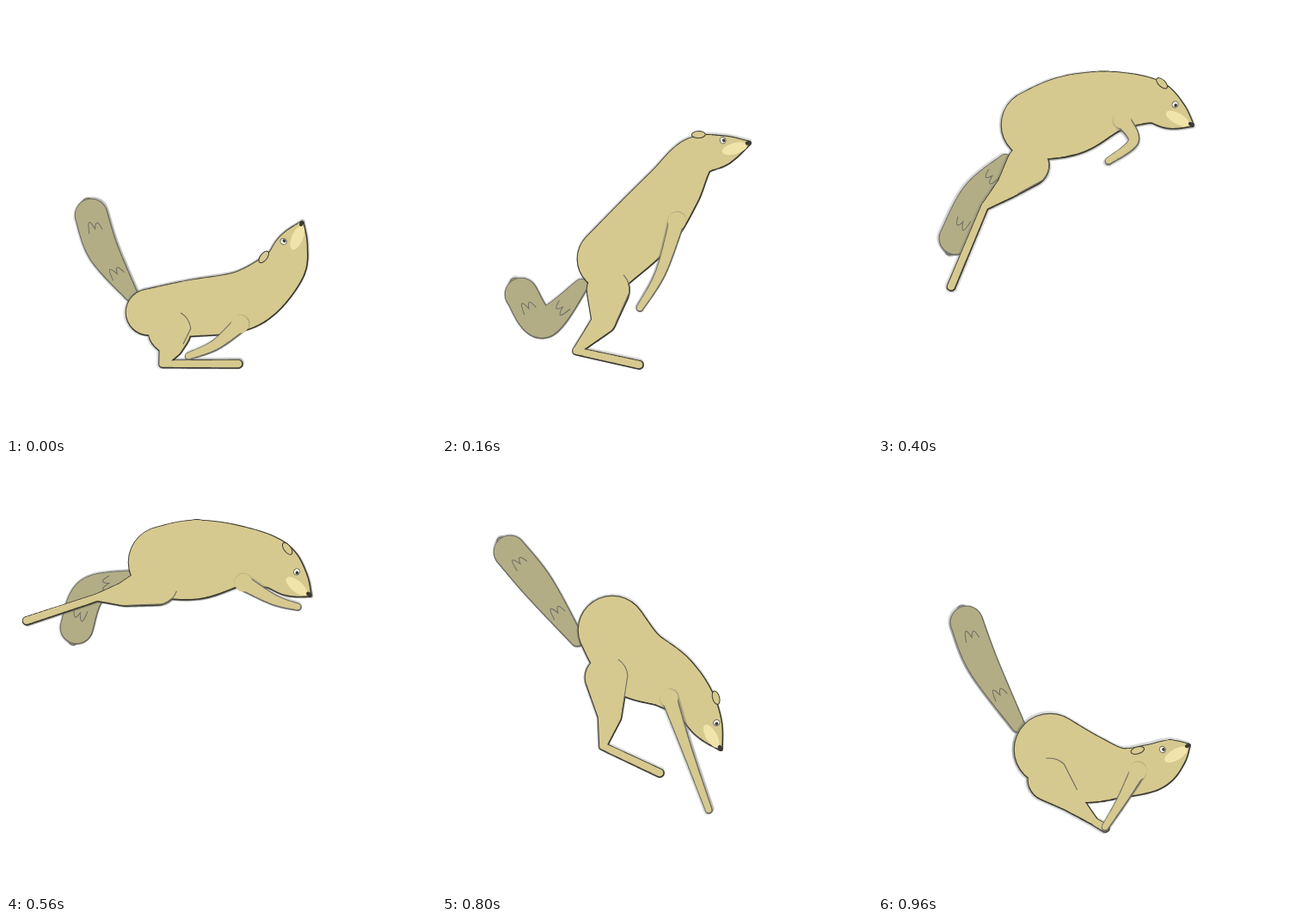
Animation, 500 px wide and 500 px high, one loop 1.04 s. Source, as an HTML page with a canvas:

```html
<!DOCTYPE html>
<html>
<head>
<meta charset="utf-8">
<style>
html, body { margin: 0; width: 100%; height: 100%; overflow: hidden; background: #fff; }
canvas { display: block; width: 500px; height: 500px; }
</style>
</head>
<body>
<canvas id="stage" width="500" height="500"></canvas>
<script>
const ctx = document.getElementById('stage').getContext('2d');
const STEP = 80, STEPS = 13;
const FUR = '#d6c98f', TAIL = '#b3ad86', CREAM = '#f1e4aa', INK = '#3b3a33', PENCIL = '#6d6c64';

// Joint radii, root to tip. Spine joints carry their own radius.
const RADII = { tail: [8, 18, 19], leg: [25, 14, 4.5, 5], arm: [9, 6, 4] };

// Joints at key steps. Spine: rump, loin, chest, nape. Leg: hip, knee, heel, toe.
const poses = [
  { at: 0, nose: [[344, 252]],
    spine: [[166, 356, 27], [218, 351, 33], [278, 341, 34], [320, 308, 26]],
    tail: [[145, 335], [113, 285], [99, 243]],
    leg: [[190, 378], [192, 395], [182, 416], [270, 416]],
    arm: [[272, 370], [243, 394], [212, 407]] },
  { at: 2, nose: [[357, 159]],
    spine: [[194, 294, 37], [236, 254, 39], [267, 215, 33], [293, 177, 24]],
    tail: [[162, 325], [118, 368], [92, 335]],
    leg: [[193, 330], [188, 367], [156, 401], [229, 417]],
    arm: [[273, 250], [254, 310], [230, 351]] },
  { at: 3, nose: [[366, 129]],
    spine: [[190, 233, 31], [213, 196, 38], [262, 157, 37], [303, 136, 30]],
    tail: [[164, 258], [124, 323], [87, 363]],
    leg: [[192, 267], [184, 312], [162, 342], [192, 413]],
    arm: [[279, 178], [272, 222], [251, 255]] },
  { at: 5, nose: [[365, 138]],
    spine: [[184, 138, 41], [222, 127, 46], [267, 112, 36], [315, 110, 26]],
    tail: [[148, 180], [115, 220], [90, 270]],
    leg: [[174, 185], [152, 209], [124, 233], [85, 326]],
    arm: [[284, 132], [297, 157], [268, 180]] },
  { at: 7, nose: [[353, 152]],
    spine: [[184, 114, 42], [220, 111, 46], [266, 107, 36], [308, 115, 29]],
    tail: [[141, 132], [97, 150], [82, 190]],
    leg: [[175, 139], [138, 151], [106, 155], [24, 182]],
    arm: [[276, 138], [312, 158], [339, 166]] },
  { at: 8, tail: [[145, 147], [85, 150], [29, 151]] },
  { at: 9, tail: [[150, 175], [92, 128], [46, 108]] },
  { at: 10, nose: [[324, 331]],
    spine: [[198, 193, 40], [222, 228, 42], [262, 249, 34], [291, 274, 25]],
    tail: [[157, 204], [112, 142], [79, 102]],
    leg: [[191, 248], [195, 292], [187, 328], [253, 359]],
    arm: [[264, 272], [284, 330], [310, 402]] },
  { at: 12, nose: [[361, 327]],
    spine: [[200, 332, 42], [236, 352, 41], [280, 359, 29], [317, 353, 27]],
    tail: [[163, 304], [122, 233], [103, 184]],
    leg: [[199, 367], [222, 389], [252, 416], [264, 423]],
    arm: [[302, 357], [284, 390], [264, 422]] }
];

const mix = (a, b, k) => a.map((v, i) => v + (b[i] - v) * k);
const angle = (a, b) => Math.atan2(b[1] - a[1], b[0] - a[0]);

function joints(name, step) {
  const keys = poses.filter(p => p[name]);
  const a = keys.filter(p => p.at <= step).pop();
  const b = keys.find(p => p.at >= step);
  const k = (step - a.at) / (b.at - a.at || 1);
  const r = RADII[name];
  return a[name].map((j, i) => mix(j, b[name][i], k).concat(r ? r[i] : []));
}

// Circles swept along the joints: Catmull-Rom, or straight bones.
function sweep(js, bones) {
  const dots = [], n = 40, last = js.length - 1;
  for (let s = 0; s < last * n; s++) {
    const i = Math.floor(s / n), t = s / n - i;
    const [a, b, c, d] = [js[Math.max(0, i - 1)], js[i], js[i + 1], js[Math.min(last, i + 2)]];
    dots.push(bones ? mix(b, c, t) : b.map((v, j) =>
      v + t / 2 * (c[j] - a[j] + t * (2 * a[j] - 5 * v + 4 * c[j] - d[j]
        + t * (3 * (v - c[j]) + d[j] - a[j])))));
  }
  return dots.concat([js[last]]);
}

let seed = 1;
function loose(size) {
  seed = (seed * 16807) % 2147483647;
  return (seed / 2147483647 - 0.5) * size;
}

function blot(dots, color, grow, dx = 0, dy = 0, alpha = 1) {
  ctx.beginPath();
  for (const [x, y, r] of dots) {
    ctx.moveTo(x + dx + r + grow, y + dy);
    ctx.arc(x + dx, y + dy, Math.max(0.5, r + grow), 0, 7);
  }
  ctx.globalAlpha = alpha;
  ctx.fillStyle = color;
  ctx.fill();
  ctx.globalAlpha = 1;
}

// Soft pencil edge, firm line slightly heavier below, then the fill.
function shape(dots, fill, line) {
  for (let i = 0; i < 3; i++) blot(dots, PENCIL, 0.8, loose(4), loose(4), 0.25);
  blot(dots, line, 0.6, 0.3, 0.4);
  blot(dots, fill, -0.7);
}

function stroke(color, width) {
  ctx.strokeStyle = color;
  ctx.lineWidth = width;
  ctx.stroke();
}

function oval(x, y, rx, ry, tilt, fill, line) {
  ctx.beginPath();
  ctx.ellipse(x, y, rx, ry, tilt, 0, 7);
  ctx.fillStyle = fill;
  ctx.fill();
  if (line) stroke(line, 1);
}

function local([x, y], turn, paint) {
  ctx.save();
  ctx.translate(x, y);
  ctx.rotate(turn);
  paint();
  ctx.restore();
}

function drawTail(js) {
  const dots = sweep(js), n = dots.length, tip = dots[n - 1];
  const turn = angle(dots[n - 12], tip);
  const tuft = [tip[0] + 16 * Math.cos(turn), tip[1] + 16 * Math.sin(turn), 5];
  shape([tuft], TAIL, PENCIL);
  shape(dots, TAIL, PENCIL);
  for (const u of [0.28, 0.8]) {
    const i = Math.round(u * n);
    local(dots[i], angle(dots[i - 5], dots[i]) + Math.PI / 2, () => {
      ctx.beginPath();
      ctx.moveTo(-8, 8);
      ctx.quadraticCurveTo(-5, -16, 0, 4);
      ctx.quadraticCurveTo(5, -10, 8, 7);
      stroke(PENCIL, 1);
    });
  }
}

// Front edge of the thigh, running down to the knee.
function drawThigh([hip, knee]) {
  const front = angle(hip, knee) - Math.PI / 2;
  ctx.beginPath();
  ctx.arc(hip[0], hip[1], hip[2], front - 0.9, front);
  ctx.lineTo(knee[0] + knee[2] * Math.cos(front), knee[1] + knee[2] * Math.sin(front));
  stroke(PENCIL, 1.1);
}

function drawArm(js) {
  const [x, y, r] = js[0];
  shape(sweep(js), FUR, PENCIL);
  blot([[x, y, r]], FUR, 1.5);
}

function drawHead(nape, nose) {
  local(nose, angle(nape, nose), () => {
    oval(-54, -25, 8, 4, 0.25, FUR, INK);
    oval(-18, 2, 15, 6.5, 0, CREAM);
    oval(-28.5, -11, 3.4, 3.8, 0, '#f8f6ea', PENCIL);
    oval(-27.5, -10.5, 1.7, 2, 0, INK);
    oval(-1, 0, 3.4, 2.3, 0, INK);
  });
}

function draw(step) {
  seed = 91 + step * 577;
  ctx.fillStyle = '#fff';
  ctx.fillRect(0, 0, 500, 500);
  const [spine, leg, [nose]] = ['spine', 'leg', 'nose'].map(name => joints(name, step));
  const nape = spine[3];
  const skull = [...mix(nape, nose, 0.5).slice(0, 2), nape[2] / 2 + 5.5];

  drawTail(joints('tail', step));
  shape([...sweep([...spine, skull, [...nose, 2]]), ...sweep(leg, true)], FUR, INK);
  drawThigh(leg);
  drawArm(joints('arm', step));
  drawHead(nape, nose);
}

const start = performance.now();
let shown = -1;
function tick() {
  const step = Math.floor((performance.now() - start) / STEP) % STEPS;
  if (step !== shown) draw(shown = step);
  requestAnimationFrame(tick);
}
tick();
</script>
</body>
</html>
```
